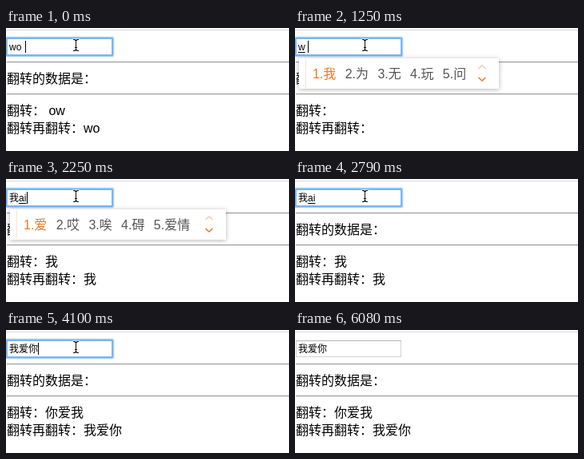
Animation, 354 px wide and 154 px high, one loop 6180 ms. Source, as an HTML page with a canvas:

```html
<!DOCTYPE html>
<html lang="zh-CN">
<head>
<meta charset="utf-8">
<title>翻转</title>
<style>
  html, body { margin: 0; width: 100%; height: 100%; overflow: hidden; background: #fff; }
  canvas { display: block; }
</style>
</head>
<body>
<canvas id="stage" width="354" height="154"></canvas>
<script>
const ctx = document.getElementById('stage').getContext('2d');
const LOOP = 6180;
const FAMILY = '"Liberation Sans", "Noto Sans CJK SC", sans-serif';

// Each step changes only the listed properties of the scene.
const steps = [
  [0, { text: 'wo ', comp: '', caret: 24, list: null, focus: true, beam: [87, 21], arrow: null }],
  [180, { text: 'wo', caret: 20 }],
  [260, { text: 'w', caret: 13 }],
  [350, { caret: 0 }],
  [590, { text: '' }],
  [770, { caret: 4 }],
  [1070, { comp: 'w', caret: 12, list: ['我', '为', '无', '玩', '问'] }],
  [1250, { caret: 16 }],
  [1600, { text: '我', comp: '', list: null }],
  [2140, { comp: 'a', caret: 23, list: ['啊', '爱', '按', '安', '阿'] }],
  [2250, { comp: 'ai', caret: 26, list: ['爱', '哎', '唉', '碍', '爱情'] }],
  [2790, { caret: 0, list: null }],
  [2850, { text: '我爱', comp: '', caret: 28 }],
  [3330, { caret: 0 }],
  [3860, { comp: 'n', caret: 35, list: ['你', '妮', '尼', '呢', '腻'] }],
  [3920, { comp: 'ni', caret: 38 }],
  [4100, { text: '我爱你', comp: '', caret: 40, list: null }],
  [4640, { caret: 0 }],
  [4710, { beam: [97, 22] }],
  [4790, { beam: null, arrow: [143, 41] }],
  [4870, { arrow: [190, 66] }],
  [4930, { arrow: [232, 91] }],
  [5000, { arrow: [262, 112] }],
  [5070, { arrow: [281, 130] }],
  [5140, { arrow: [290, 145], caret: 40 }],
  [5220, { arrow: null }],
  [5640, { caret: 0 }],
  [6080, { focus: false }]
];

function sceneAt(t) {
  const scene = {};
  for (const [start, change] of steps) {
    if (start > t) break;
    Object.assign(scene, change);
  }
  return scene;
}

function rect(x, y, w, h, color) {
  ctx.fillStyle = color;
  ctx.fillRect(x, y, w, h);
}

function write(str, x, y, size = 16, color = '#000') {
  ctx.font = size + 'px ' + FAMILY;
  ctx.fillStyle = color;
  ctx.fillText(str, x, y);
  return ctx.measureText(str).width;
}

function trace(points, x, y) {
  ctx.beginPath();
  points.forEach(([dx, dy]) => ctx.lineTo(x + dx, y + dy));
}

function rule(y) {
  rect(1, y, 353, 1, '#9a9a9a');
  rect(1, y + 1, 353, 1, '#eee');
}

function drawInput({ text, comp, caret, focus }) {
  if (focus) {
    ['#e6f2fe', '#a9d1fa', '#72b3f5', '#82b8ee'].forEach((color, i) => {
      const out = 3 - i;
      ctx.fillStyle = color;
      ctx.beginPath();
      ctx.roundRect(1 - out, 13 - out, 132 + 2 * out, 21 + 2 * out, out + 0.5);
      ctx.fill();
    });
  } else {
    rect(1, 13, 132, 21, '#d2d2d2');
    rect(1, 13, 132, 1, '#b8b8b8');
  }
  rect(2, 14, 130, 19, '#fff');
  const x = 4 + write(text, 4, 28, 12);
  if (comp) rect(x, 30, write(comp, x, 28, 12), 1, '#000');
  if (caret) rect(caret, 16, 1, 15, '#000');
}

function drawList(items) {
  const width = 250 + (items.join('').length - items.length) * 20;
  ctx.save();
  ctx.shadowColor = 'rgba(0,0,0,0.3)';
  ctx.shadowBlur = 6;
  ctx.shadowOffsetY = 1;
  rect(5, 38, width, 38, '#fff');
  ctx.restore();
  rect(13, 39, 1, 36, '#f6e3d6');
  items.forEach((item, i) => {
    write(i + 1 + '.' + item, 22 + i * 40.7, 63, 16, i ? '#555' : '#f07820');
  });
  ctx.lineWidth = 1.5;
  const mid = width - 16;
  [[51, -4, '#f8c8a8'], [62, 4, '#f07820']].forEach(([y, dy, color]) => {
    ctx.strokeStyle = color;
    trace([[-4.5, 0], [0, dy], [4.5, 0]], mid, y);
    ctx.stroke();
  });
}

function drawBeam([x, y]) {
  const parts = [[0, -5, 1, 11], [-3, -7, 3, 1], [1, -7, 3, 1], [-1, -6, 3, 1],
    [-3, 7, 3, 1], [1, 7, 3, 1], [-1, 6, 3, 1], [-1, 3, 3, 1]];
  parts.forEach(([dx, dy, w, h]) => rect(x + dx - 1, y + dy - 1, w + 2, h + 2, 'rgba(255,255,255,0.6)'));
  parts.forEach(([dx, dy, w, h]) => rect(x + dx, y + dy, w, h, '#111'));
}

function drawArrow([x, y]) {
  trace([[0, 0], [0, 14], [3.2, 11], [5.5, 16.3], [7.8, 15.3], [5.5, 10.2], [9.8, 10.2]], x, y);
  ctx.closePath();
  ctx.save();
  ctx.shadowColor = 'rgba(0,0,0,0.3)';
  ctx.shadowBlur = 2;
  ctx.shadowOffsetY = 1;
  ctx.strokeStyle = '#fff';
  ctx.lineWidth = 2;
  ctx.stroke();
  ctx.restore();
  ctx.fillStyle = '#000';
  ctx.fill();
}

function draw(t) {
  const scene = sceneAt(t);
  rect(0, 0, 354, 154, '#fff');
  rect(0, 2, 354, 1, '#dadada');
  rule(42);
  rule(82);
  write('翻转的数据是：', 1, 69);
  write('翻转：' + [...scene.text].reverse().join(''), 1, 109);
  write('翻转再翻转：' + scene.text, 1, 131);
  drawInput(scene);
  if (scene.list) drawList(scene.list);
  if (scene.beam) drawBeam(scene.beam);
  if (scene.arrow) drawArrow(scene.arrow);
}

const begin = performance.now();
function tick() {
  draw((performance.now() - begin) % LOOP);
  requestAnimationFrame(tick);
}
tick();
</script>
</body>
</html>
```
